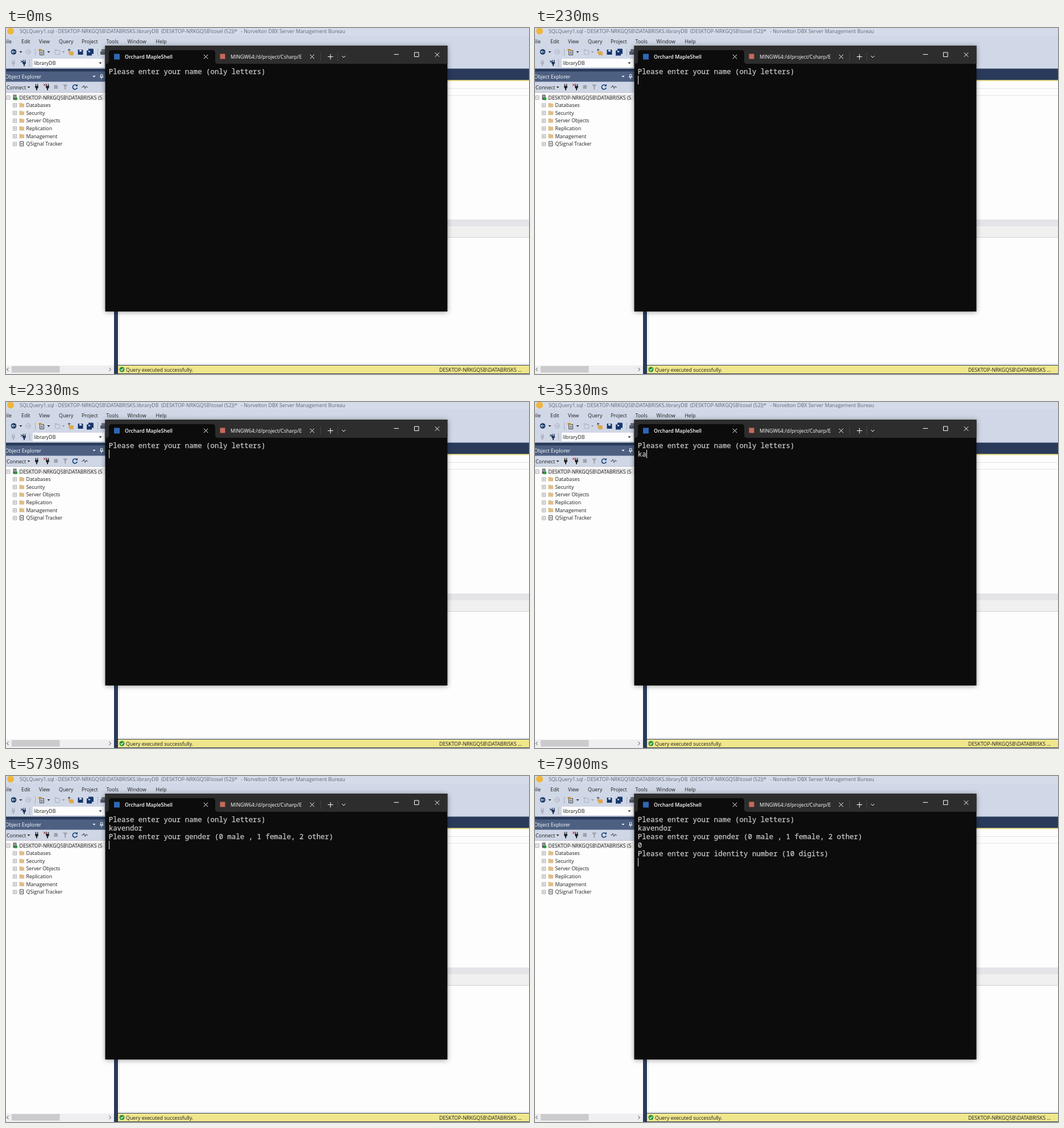
Write an HTML page that moves like this. It is 920x609 px and loops after 8000 ms.

```html
<!DOCTYPE html>
<html lang="en">
<head>
<meta charset="utf-8">
<title>Console input</title>
<style>
html, body { margin: 0; width: 100%; height: 100%; overflow: hidden; }
svg { display: block; width: 920px; height: 609px; }
text { font: 8.85px "Open Sans", sans-serif; fill: #1e1e1e; white-space: pre; }
.title text { fill: #626975; }
.light text { fill: #fff; }
.light .active { font-weight: 600; }
#console text { font: 12.43px "Noto Sans Mono", monospace; fill: #ccc; stroke: #ccc; stroke-width: .25px; }
.window { filter: drop-shadow(0 1px 4px #0006); }
.line { fill: none; stroke: var(--ink, #1b2b4a); }
.grey { --ink: #a9afbd; }
.white { --ink: #fff; }
.dark { --ink: #444; }
.box { --ink: #888; stroke-width: .8; }
.edge { --ink: #e2e4ea; }
</style>
</head>
<body>
<svg viewBox="0 0 920 609">
  <defs>
    <path id="caret" d="M-2.5-1h5L0 1.7z"/>
    <g id="plug"><path d="M-2.8-1.5h5.6v3L1 3.3V6h-2V3.3l-1.8-1.8z"/><path d="M-1.6-5v4M1.6-5v4" stroke="currentColor" stroke-width="1.3"/></g>
    <path id="disk" d="M-4.5-4.5h8l1 1v8h-9z"/>
    <path id="cross" d="M-3.7-3.7l7.4 7.4M3.7-3.7l-7.4 7.4"/>
  </defs>

  <rect width="920" height="609" fill="#293a5a"/>
  <rect width="920" height="71.5" fill="#d0d7e6"/>
  <rect width="920" height="13" fill="#d5dbe8"/>

  <circle cx="8" cy="5.5" r="6" fill="#f0b63c"/>
  <g class="title">
    <text x="24" y="9">SQLQuery1.sql -</text>
    <text x="91.5" y="9">DESKTOP-NRKGQ5B\DATABRISKS.libraryDB</text>
    <text x="273" y="9">(DESKTOP-NRKGQ5B\tosel (52))*</text>
    <text x="413" y="9">- Norvelton DBX Server Management Bureau</text>
  </g>
  <g id="menu"></g>

  <!-- toolbars -->
  <circle cx="13.5" cy="42" r="4.8" fill="#1b3a6b"/>
  <path class="line white" d="M16.5 42h-6m2.5-2.5L10.5 42l2.5 2.5"/>
  <circle class="line grey" cx="39" cy="42" r="4.3"/>
  <path class="line grey" d="M36.5 42h5m-2-2l2 2-2 2"/>
  <path class="line dark" d="M59.5 39.5h7v8h-7zM61 42.5h4M61 45h4"/>
  <path d="M57.5 38.5h5" stroke="#c88a1c" stroke-width="3"/>
  <path class="line grey" d="M86.5 39.5h8v7h-8zM85 38h5"/>
  <path d="M109 41h7l3 1v6h-7z" fill="#dba951"/>
  <path class="line" d="M109.5 38.5h4m-2-2l-2 2 2 2"/>
  <g fill="#16376f">
    <use href="#disk" x="131" y="42.5"/><use href="#disk" x="149.5" y="41"/><use href="#disk" x="146.5" y="44"/>
  </g>
  <path d="M129 38.5h4v3h-4zM145 40.5h3v2h-3z" fill="#e5eaf4"/>
  <path d="M166 41h9v6h-9zM168 37.5h7v3h-7z" fill="#555c68"/>
  <path class="line grey" d="M51.5 36v13M161.5 36v13M41.5 55v13"/>
  <use href="#plug" x="13" y="61" fill="#adb3c0" color="#adb3c0"/>
  <use href="#plug" x="32" y="61" fill="#1d355f" color="#1d355f"/>
  <path class="line" d="M26 57l4 4m-4 0l3-3"/>
  <rect x="47" y="54" width="126" height="15" fill="#fdfdfd"/>
  <text x="49" y="64.5">libraryDB</text>
  <g fill="#222">
    <use href="#caret" x="26" y="42"/><use href="#caret" x="75" y="42"/>
    <use href="#caret" x="101" y="42" fill="#999"/><use href="#caret" x="166" y="61.5"/>
  </g>

  <!-- explorer -->
  <rect y="76.5" width="190" height="18" fill="#4d6082"/>
  <g class="light"><text x="-1.5" y="88.5">Object Explorer</text></g>
  <use href="#caret" x="155" y="85" fill="#fff"/>
  <path class="line white" d="M166.5 82h3.5v4h-3.5zM165 86.5h6.5M168 87v3"/>
  <rect y="94.5" width="190" height="19" fill="#cfd6e5"/>
  <text x="1" y="107.5">Connect</text>
  <use href="#caret" x="40" y="104" fill="#222"/>
  <use href="#plug" x="54" y="103.5" fill="#222" color="#222"/>
  <use href="#plug" x="73" y="103.5" fill="#222" color="#222"/>
  <path class="line" style="--ink:#b3242b" d="M66 98l4 4m0-4l-4 4"/>
  <path d="M84.5 100.5h6.5v6.5h-6.5zM100 99.5h8.5l-3.3 4v5h-2v-5z" fill="#9ca2ae"/>
  <path class="line" style="--ink:#123f7c" d="M124.5 101.5a4 4 0 1 0 .7 3.5" stroke-width="1.6"/>
  <path d="M122 102.5h4v-4z" fill="#123f7c"/>
  <path class="line dark" d="M133 104h2.5l1.5-3 2 5.5 2-4 1 1.5h2"/>
  <rect y="113.5" width="190" height="480.5" fill="#fdfdfd"/>
  <rect x="22" y="116" width="168" height="11.5" fill="#eee"/>
  <path class="line box" d="M1 119.5h6v6h-6zM2.5 122.5h3"/>
  <path d="M12.5 117.5h6v9h-6z" fill="#555"/>
  <path class="line white" d="M13.5 119.5h4M13.5 121.5h4" stroke-width=".8"/>
  <circle cx="17.5" cy="124.5" r="2.7" fill="#2c9a42"/>
  <text x="23.5" y="125.5">DESKTOP-NRKGQ5B\DATABRISKS (S</text>
  <g id="tree"></g>
  <rect y="594" width="190" height="15" fill="#efeff1"/>
  <rect x="10" y="595" width="84.5" height="11.5" fill="#cbcbcd"/>
  <path class="line dark" d="M4.5 598l-3 3 3 3M181.5 598l3 3-3 3"/>

  <!-- document -->
  <rect x="197" y="92" width="723" height="501" fill="#fdfdfd"/>
  <rect x="197" y="91.5" width="723" height="2" fill="#f3e28a"/>
  <path class="line edge" d="M197 106.5h723M197 118.5h723"/>
  <rect x="197" y="337" width="723" height="12.5" fill="#e5e5e9"/>
  <rect x="197" y="349.5" width="723" height="18.5" fill="#f0f0f0"/>
  <path class="line" style="--ink:#d0d0cc" d="M197 368.5h723"/>
  <path class="line edge" d="M199.5 499v91.5H920"/>
  <rect x="197" y="594" width="723" height="14" fill="#f0e68c"/>
  <circle cx="204" cy="601" r="4.5" fill="#27943b"/>
  <path class="line white" d="M201.7 601l1.7 1.8 3-3.5" stroke-width="1.2"/>
  <text x="211" y="604.5">Query executed successfully.</text>
  <text x="762" y="604.5">DESKTOP-NRKGQ5B\DATABRISKS ...</text>

  <!-- terminal -->
  <g class="window">
    <rect x="174.5" y="31" width="602" height="468" fill="#0c0c0c"/>
    <rect x="174.5" y="31" width="602" height="32" fill="#2d2d2d"/>
  </g>
  <path d="M176 63q5 0 5-5V44q0-5 5-5h177q5 0 5 5v14q0 5 5 5z" fill="#0c0c0c"/>
  <rect x="190" y="45.5" width="10" height="10" fill="#2f66b5"/>
  <rect x="376.5" y="45.5" width="9" height="9" fill="#c7695a"/>
  <g class="light">
    <text class="active" x="209" y="54">Orchard MapleShell</text>
    <text x="395" y="54">MINGW64:/d/project/Csharp/E</text>
  </g>
  <g class="line white">
    <use href="#cross" x="351.5" y="50.5"/><use href="#cross" x="538.5" y="50.5"/><use href="#cross" x="758.5" y="47"/>
    <path d="M566 50.5h9.5M570.8 46v9.5M591 49l3 3 3-3M682.5 46.5h8.5M718.5 43h7.5v7.5h-7.5z"/>
    <path class="line dark" d="M553.5 43v15M583.5 43v15"/>
  </g>
  <g id="console"></g>
  <rect id="cursor" width="1" height="15" fill="#eee"/>
</svg>
<script>
const LOOP = 8000, LEFT = 180.7, CHAR = 7.46, BASE = 81, LINE = 14.9;
const NAME = "kavendor";
const KEYS = [3270, 3530, 3800, 4000, 4170, 4330, 4600, 4900];
const BLINKS = [130, 670, 1230, 1770, 2330, 2870, 3270, 6270, 6830];
const NAME_ENTERED = 5570, GENDER_KEY = 7230, GENDER_ENTERED = 7670;

const byId = id => document.getElementById(id);
const label = (text, x, y) => `<text x="${x}" y="${y}">${text}</text>`;

byId("menu").innerHTML = [["File", -4], ["Edit", 27], ["View", 58], ["Query", 93], ["Project", 133],
  ["Tools", 176.5], ["Window", 213.5], ["Help", 263.5]].map(([name, x]) => label(name, x, 27)).join("");

byId("tree").innerHTML = ["Databases", "Security", "Server Objects", "Replication", "Management", "QSignal Tracker"]
  .map((name, i, all) => {
    const icon = i < all.length - 1
      ? '<path d="M23.5-4h4l1 1h3.5v6.5h-8.5z" fill="#dfbd86"/>'
      : '<path class="line dark" d="M24.5-4.5h6v8h-6zM26-2l3 3m0-3l-3 3"/>';
    return `<g transform="translate(0 ${136 + i * 13.65})">${icon}
      <path class="line box" d="M12.5-3h6v6h-6zM14 0h3M15.5-1.5v3"/>
      ${label(name, 35.5, 3)}</g>`;
  }).join("");

const rows = Array.from({ length: 6 }, (_, i) => {
  byId("console").insertAdjacentHTML("beforeend", label("", LEFT, BASE + i * LINE));
  return byId("console").lastElementChild;
});
const cursor = byId("cursor");
const countPast = (times, t) => times.filter(time => time <= t).length;

function consoleLines(t) {
  const lines = ["Please enter your name (only letters)", NAME.slice(0, countPast(KEYS, t))];
  if (t >= NAME_ENTERED)
    lines.push("Please enter your gender (0 male , 1 female, 2 other)", t >= GENDER_KEY ? "0" : "");
  if (t >= GENDER_ENTERED)
    lines.push("Please enter your identity number (10 digits)", "");
  return lines;
}

function draw(now) {
  const t = now % LOOP, lines = consoleLines(t), last = lines.length - 1;
  rows.forEach((row, i) => row.textContent = lines[i] || "");
  cursor.setAttribute("x", Math.round(LEFT + lines[last].length * CHAR));
  cursor.setAttribute("y", Math.round(BASE + last * LINE - 12));
  cursor.setAttribute("visibility", countPast(BLINKS, t) % 2 ? "visible" : "hidden");
  requestAnimationFrame(draw);
}
draw(0);
</script>
</body>
</html>
```
